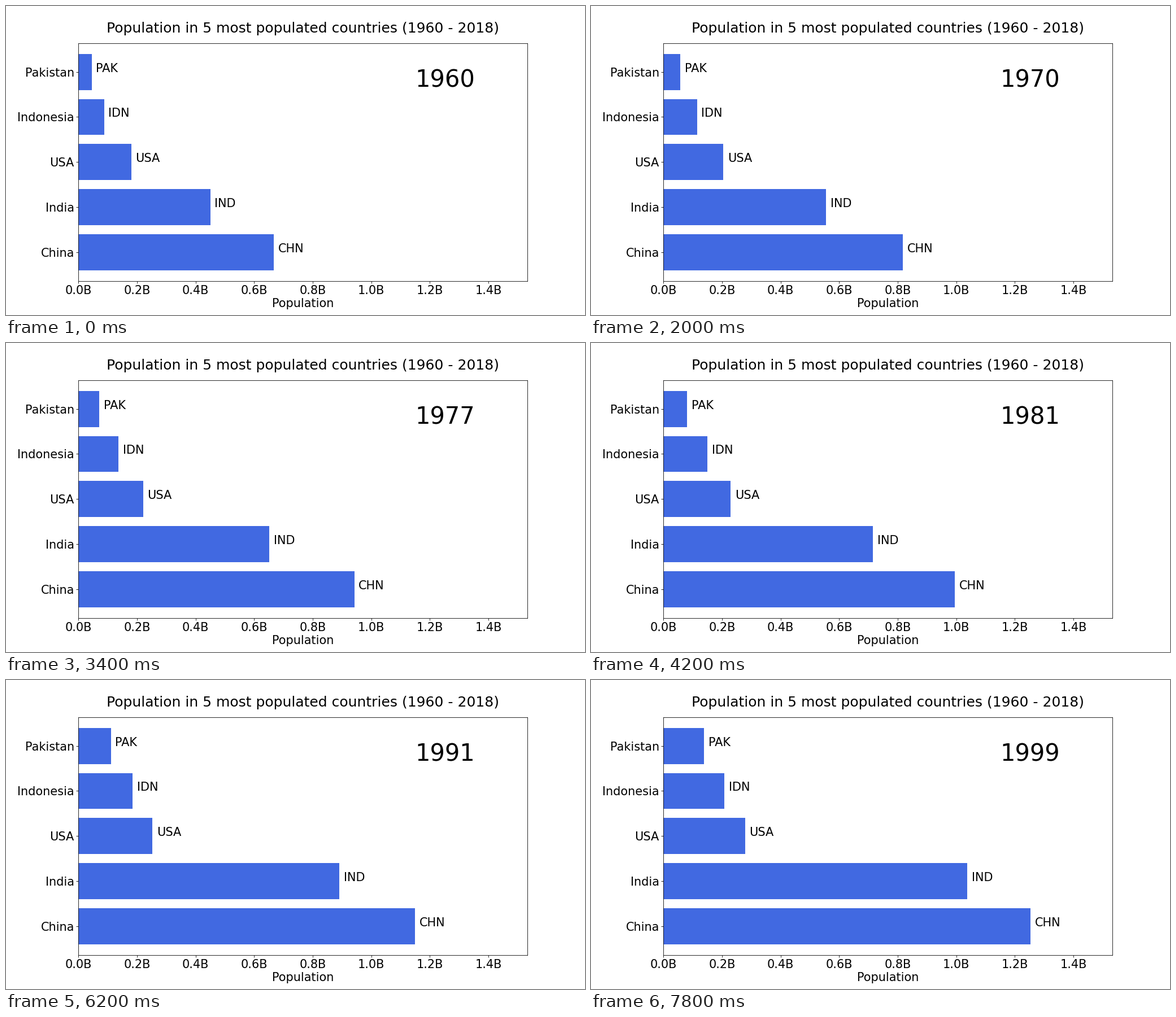
Animation of 1025x547 px, one loop 8000 ms. Source, as a matplotlib script:

```python
import numpy as np
import matplotlib.pyplot as plt
from matplotlib.animation import FuncAnimation
from matplotlib.ticker import MultipleLocator

# At 72 dpi one point equals one pixel.
DPI = 72
WIDTH, HEIGHT = 1025, 547
START, COUNT, STEP_MS = 1960, 40, 200
X_MAX = 1.532
LABEL_GAP = 0.015

plt.rcParams.update({
    "font.family": "DejaVu Sans",
    "font.size": 20.83,
    "axes.linewidth": 0.83,
})

years = START + np.arange(COUNT)


def smooth(*values):
    """Quartic growth curve through one value (in millions) per decade."""
    decades = [1960, 1970, 1980, 1990, 1999]
    return np.polynomial.Polynomial.fit(decades, values, 4)(years)


def stepwise(points):
    """Straight growth between a few (year, millions) points."""
    return np.interp(years, *zip(*points))


countries = {
    "China": ("CHN", stepwise([
        (1960, 667), (1961, 660), (1962, 666), (1965, 715), (1970, 818),
        (1975, 916), (1980, 981), (1985, 1051), (1990, 1135), (1995, 1205),
        (1999, 1253)])),
    "India": ("IND", smooth(450.5, 555.2, 699, 873.3, 1038.1)),
    "USA": ("USA", smooth(180.7, 205.1, 227.2, 249.6, 279)),
    "Indonesia": ("IDN", smooth(87.8, 114.8, 147.5, 181.4, 208.6)),
    "Pakistan": ("PAK", smooth(45.2, 58.1, 78.1, 107.7, 138.5)),
}
codes, series = zip(*countries.values())
billions = np.array(series) / 1000
rows = range(len(countries))

fig = plt.figure(figsize=(WIDTH / DPI, HEIGHT / DPI), dpi=DPI,
                 facecolor="white")
ax = fig.add_axes([0.125, 0.11, 0.775, 0.77])

bars = ax.barh(rows, billions[:, 0], height=0.8, color="royalblue")
labels = [ax.text(0, row, code) for row, code in zip(rows, codes)]
year_text = ax.text(1.15, 3.67, "", fontsize=41.67)

ax.set_xlim(0, X_MAX)
ax.set_ylim(-0.64, 4.64)
ax.set_yticks(rows, countries)
ax.xaxis.set_major_locator(MultipleLocator(0.2))
ax.xaxis.set_major_formatter(lambda x, pos: f"{x:.1f}B")
ax.tick_params(length=3.65, width=0.83, pad=3.65)
ax.set_xlabel("Population", labelpad=3)
ax.set_title("Population in 5 most populated countries (1960 - 2018)",
             fontsize=25, pad=18.6)


def update(frame):
    for bar, label, value in zip(bars, labels, billions[:, frame]):
        bar.set_width(value)
        label.set_x(value + LABEL_GAP)
    year_text.set_text(str(years[frame]))
    return [*bars, *labels, year_text]


anim = FuncAnimation(fig, update, frames=COUNT, interval=STEP_MS,
                     repeat=True, repeat_delay=0, blit=False)

plt.show()
```
